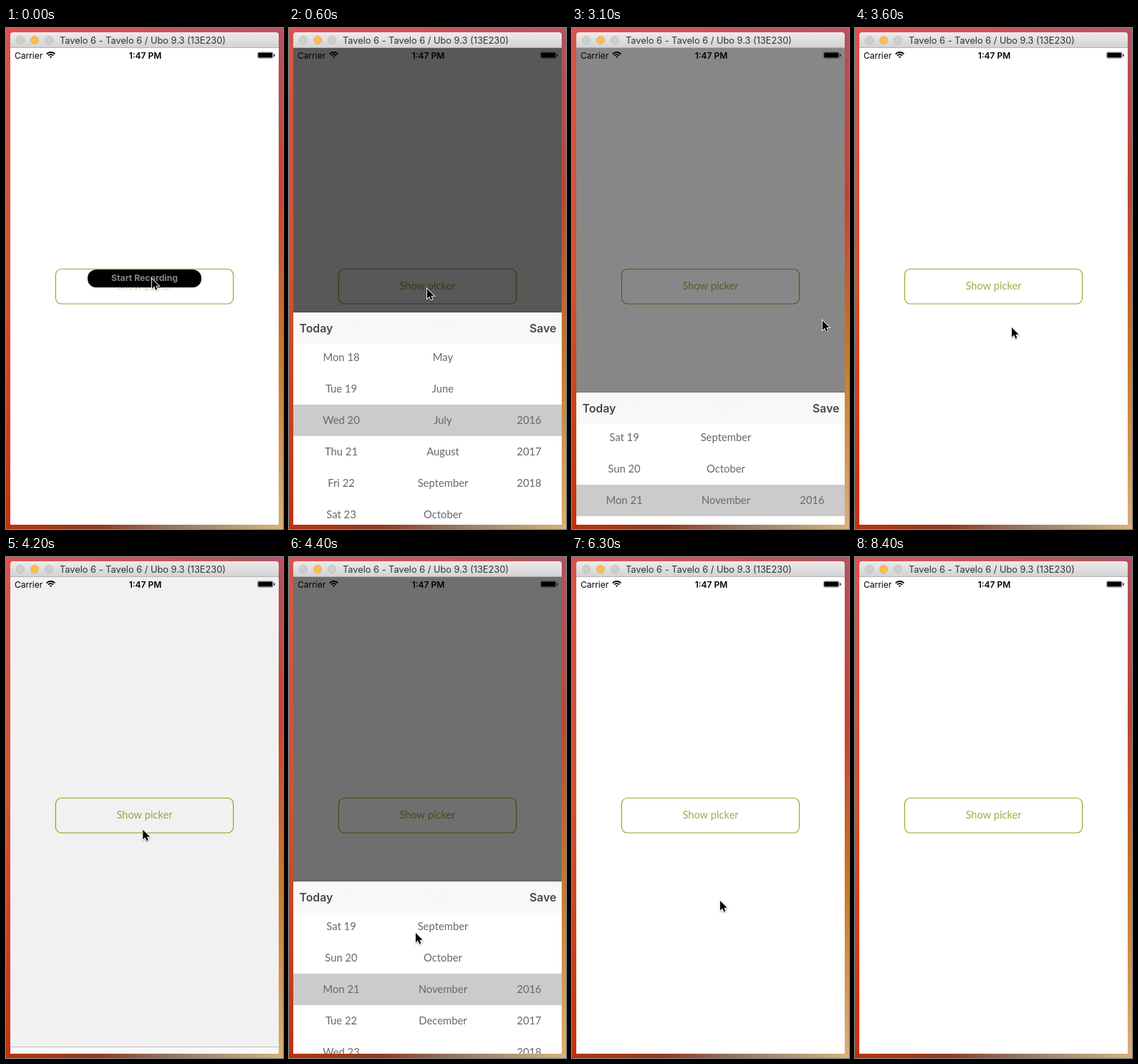
Recreate the animation shown at these times as an HTML page with a canvas. Size 387 by 701 pixels, loop 8.5 s.

```html
<!DOCTYPE html>
<html lang="en">
<head>
<meta charset="utf-8">
<title>Date picker</title>
<style>
html, body { margin: 0; width: 100%; height: 100%; overflow: hidden; }
canvas { display: block; }
</style>
</head>
<body>
<canvas id="stage" width="387" height="701"></canvas>
<script>
const ctx = document.getElementById('stage').getContext('2d');
const LOOP = 8500, STEP = 100;
const LEFT = 6, TOP = 28, BOTTOM = 695, WIDTH = 375, HEIGHT = BOTTOM - TOP;
const SHEET = 303, ROW = 44;
const UI = 'Inter, Arial, sans-serif', ROUND = 'Lato, Arial, sans-serif';
const DAYS = 'Sun Mon Tue Wed Thu Fri Sat'.split(' ');
const MONTHS = ('January February March April May June July August ' +
  'September October November December').split(' ');

const BUTTON = { x: 192, y: 364 };
const TODAY = { x: 38, y: 412 };
const SAVE = { x: 352, y: 408 };

// Each glide leads the cursor on from wherever it rests.
const glides = [
  { from: 0, to: 300, ...BUTTON },
  { from: 700, to: 1000, x: 80, y: 550 },
  { from: 1500, to: 1900, x: 197, y: 602 },
  { from: 1950, to: 2250, x: 197, y: 480 },
  { from: 2450, to: 2750, ...SAVE },
  { from: 3050, to: 3600, x: 218, y: 418 },
  { from: 3600, to: 3900, ...BUTTON },
  { from: 4150, to: 4400, x: 176, y: 525 },
  { from: 4400, to: 4750, ...TODAY },
  { from: 5150, to: 5550, ...SAVE },
  { from: 5800, to: 6300, x: 206, y: 480 },
  { from: 7700, to: 7900, x: 395, y: 300 }
];

const span = (t, from, to) => Math.min(1, Math.max(0, (t - from) / (to - from)));

function ease(t, from, to) {
  const u = span(t, from, to);
  return u * u * (3 - 2 * u);
}

function cursorAt(t) {
  let x = 203, y = 350;
  for (const g of glides) {
    const e = ease(t, g.from, g.to);
    x += (g.x - x) * e;
    y += (g.y - y) * e;
  }
  return [x, y];
}

function visit(t, open, close) {
  const rise = 1 - (1 - span(t, open, open + 500)) ** 3;
  return rise * (1 - span(t, close, close + 400) ** 2);
}

function rect(x, y, w, h, fill) {
  ctx.fillStyle = fill;
  ctx.fillRect(x, y, w, h);
}

function rounded(x, y, w, h, r) {
  ctx.beginPath();
  ctx.roundRect(x, y, w, h, r);
}

function stroke(color, width) {
  ctx.strokeStyle = color;
  ctx.lineWidth = width;
  ctx.stroke();
}

function gradient(x, y, ...colors) {
  const g = ctx.createLinearGradient(0, 0, x, y);
  colors.forEach((c, i) => g.addColorStop(i / (colors.length - 1), c));
  return g;
}

function label(text, x, y, font, color, align = 'center') {
  ctx.font = font;
  ctx.textAlign = align;
  ctx.fillStyle = color;
  ctx.fillText(text, x, y);
}

function drawWallpaper() {
  rect(0, 0, 387, 701, gradient(0, 701, '#d9524c', '#d4512d', '#c3320f'));
  rect(200, 0, 187, 701, gradient(0, 701, '#b35162', '#c2432f', '#c87a29', '#d8b07a'));
  rect(0, 0, 387, 6, gradient(387, 0, '#dc5350', '#b75363'));
  rect(0, BOTTOM, 387, 6, gradient(387, 0, '#bc300f', '#8f3c22', '#97856a', '#dab27b'));
}

function drawTitleBar() {
  rounded(LEFT, 6, WIDTH, 22, [4, 4, 0, 0]);
  ctx.fillStyle = gradient(0, 28, '#f2f2f2', '#d2d2d2');
  ctx.fill();
  rect(LEFT, 27, WIDTH, 1, '#b3b3b3');
  ['#cecece', '#fdbc4b', '#cecece'].forEach((fill, i) => {
    ctx.beginPath();
    ctx.arc(20 + 20 * i, 17, 5.7, 0, 7);
    ctx.fillStyle = fill;
    ctx.fill();
    stroke('rgba(0,0,0,.12)', 0.8);
  });
  label('Tavelo 6 - Tavelo 6 / Ubo 9.3 (13E230)', 75, 22, '12.8px ' + UI, '#333', 'left');
}

function drawStatusBar() {
  label('Carrier', 12, 42.5, '12px ' + UI, '#000', 'left');
  label('1:47 PM', 194.5, 42.5, '600 12px ' + UI, '#000');
  for (const r of [1.4, 4.8, 8]) {
    ctx.beginPath();
    ctx.arc(62.5, 42, r, -Math.PI * 0.76, -Math.PI * 0.24);
    stroke('#000', 1.8);
  }
  rounded(351.3, 33.7, 22, 8.8, 2);
  stroke('#777', 0.6);
  rounded(352.2, 34.6, 20.2, 7, 1);
  ctx.fillStyle = '#000';
  ctx.fill();
  rect(374.3, 36.5, 1.3, 3.3, '#000');
}

function drawButton(pressed) {
  rounded(69.4, 337.2, 248.2, 48.8, 8);
  stroke('#86aa1d', 1.1);
  label('Show picker', 193.5, 366, '14.6px ' + ROUND, pressed ? '#c8d79b' : '#94b340');
}

function drawColumn(x, top, value, first, last, name) {
  for (let n = first; n <= last; n++)
    label(name(n), x, top + 156 + (n - value) * ROW, '14.8px ' + ROUND, '#686868');
}

function drawSheet(top, day, month) {
  const m = Math.round(month);
  const daysInMonth = new Date(2016, m, 0).getDate();
  const weekday = n => DAYS[new Date(2016, m - 1, n).getDay()];
  ctx.save();
  ctx.beginPath();
  ctx.rect(LEFT, top - 1, WIDTH, SHEET + 1);
  ctx.clip();
  rect(LEFT, top - 0.5, WIDTH, 0.5, 'rgba(0,0,0,.4)');
  rect(LEFT, top, WIDTH, SHEET, '#fff');
  rect(LEFT, top + 129, WIDTH, ROW, '#cbcbcb');
  drawColumn(73, top, day, 1, daysInMonth, n => weekday(n) + ' ' + n);
  drawColumn(215, top, month, 1, 12, n => MONTHS[n - 1]);
  drawColumn(335.5, top, 2016, 2016, 2018, String);
  rect(LEFT, top, WIDTH, ROW, 'rgba(248,248,248,.985)');
  label('Today', 14.5, top + 28, '600 15.8px ' + UI, '#484848', 'left');
  label('Save', 373.5, top + 28, '600 15.8px ' + UI, '#484848', 'right');
  ctx.restore();
}

function drawPill(alpha) {
  ctx.globalAlpha = alpha;
  rounded(114, 338, 159, 25, 12);
  ctx.fillStyle = '#000';
  ctx.fill();
  label('Start Recording', 193.5, 354, 'bold 12.2px ' + UI, '#858585');
  ctx.globalAlpha = 1;
}

function drawCursor(x, y) {
  const arrow = new Path2D('M1 1V14.6L4.2 11.6L6.3 16.4L8.4 15.5L6.4 10.8H10.7Z');
  ctx.save();
  ctx.translate(x, y);
  ctx.shadowColor = 'rgba(0,0,0,.35)';
  ctx.shadowBlur = 2;
  ctx.shadowOffsetY = 1;
  ctx.strokeStyle = '#fff';
  ctx.lineWidth = 1.8;
  ctx.stroke(arrow);
  ctx.shadowColor = 'transparent';
  ctx.fillStyle = '#000';
  ctx.fill(arrow);
  ctx.restore();
}

function draw(t) {
  const shown = Math.max(visit(t, 235, 2850), visit(t, 4195, 5680));
  const back = ease(t, 4850, 5300);
  const day = 20 + ease(t, 1000, 1500) - back;
  const month = 7 + 4 * (ease(t, 1950, 2650) - back);

  drawWallpaper();
  drawTitleBar();
  ctx.save();
  ctx.beginPath();
  ctx.rect(LEFT, TOP, WIDTH, HEIGHT);
  ctx.clip();
  rect(LEFT, TOP, WIDTH, HEIGHT, '#fff');
  drawStatusBar();
  drawButton(t < 200 || (t >= 4000 && t < 4200));
  if (shown > 0) {
    rect(LEFT, TOP, WIDTH, HEIGHT, `rgba(0,0,0,${0.665 * shown ** 0.7})`);
    drawSheet(Math.round(BOTTOM - SHEET * shown), day, month);
  }
  ctx.restore();
  drawPill(1 - ease(t, 0, 300));
  drawCursor(...cursorAt(t));
}

const start = performance.now();
function tick() {
  const t = (performance.now() - start) % LOOP;
  draw(Math.floor(t / STEP) * STEP);
  requestAnimationFrame(tick);
}
tick();
</script>
</body>
</html>
```
